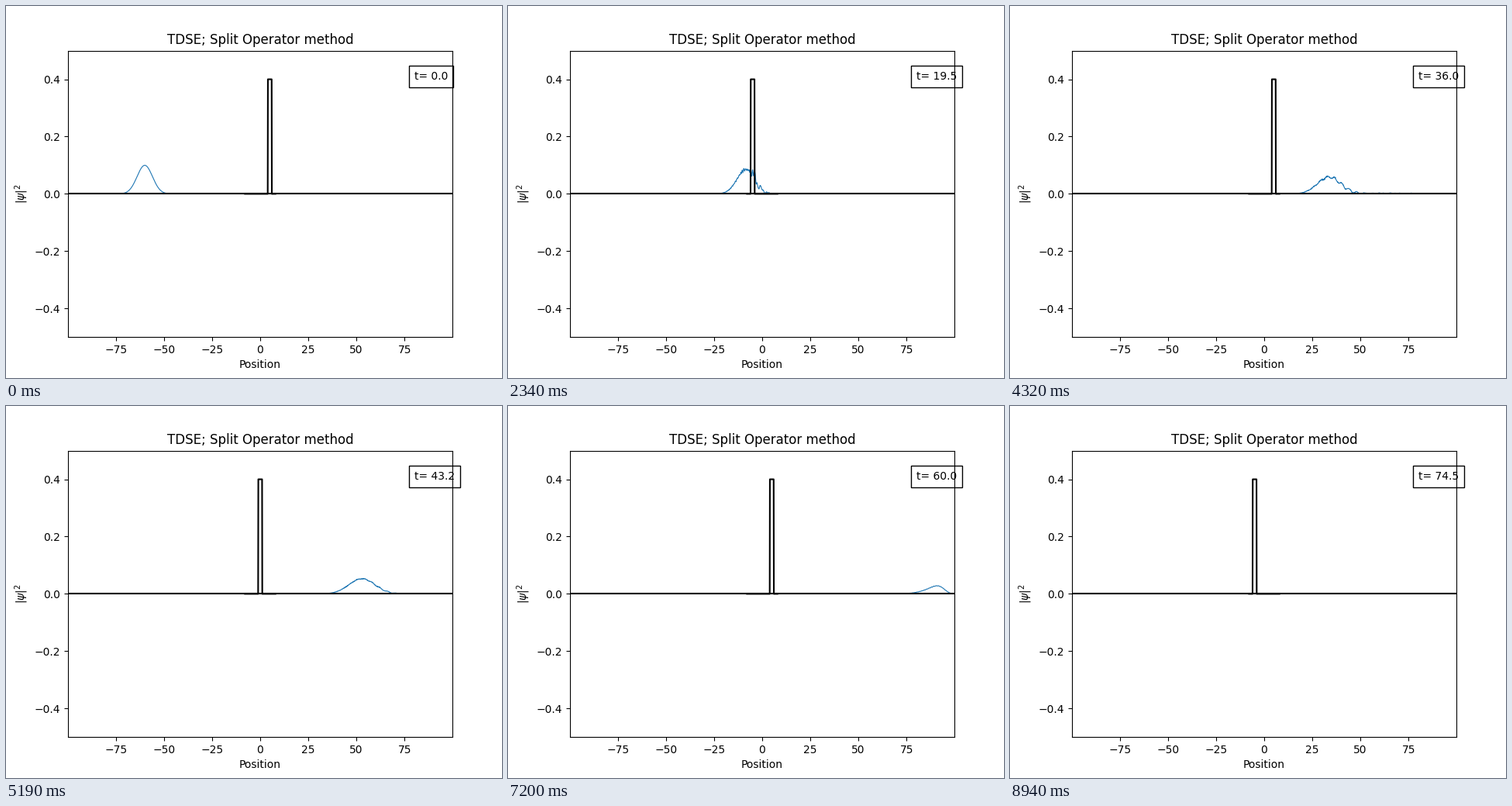
Write a matplotlib script that moves like this. It is 640 px wide and 480 px high and loops after 8.97 s.

```python
import numpy as np
import matplotlib.pyplot as plt
from matplotlib.animation import FuncAnimation

FRAMES = 299
STEPS = 5                 # time steps per frame
DT = 0.05
N, L = 2048, 200.0
SIGMA, X0, K0 = 4.0, -60.0, np.sqrt(7.0)
V0, HALF, SWING, OMEGA = 4.0, 1.0, 5.0, 2 * np.pi

x = -L / 2 + L / N * np.arange(N)
k = 2 * np.pi * np.fft.fftfreq(N, L / N)


def barrier(pos, t):
    """Square barrier whose centre swings about the origin."""
    return V0 * (np.abs(pos - SWING * np.cos(OMEGA * t)) < HALF)


def evolve():
    """Split-operator propagation; yields the density for each frame."""
    psi = (2 * np.pi * SIGMA**2) ** -0.25 * np.exp(
        -((x - X0) ** 2) / (4 * SIGMA**2) + 1j * K0 * x)
    kinetic = np.exp(-0.5j * k**2 * DT)
    edge = np.clip((np.abs(x) - 85) / 15, 0, None)
    absorb = np.exp(-1.8 * edge**3 * DT)
    for frame in range(FRAMES):
        yield np.abs(psi) ** 2
        for step in range(STEPS):
            t = (frame * STEPS + step) * DT
            half = np.exp(-0.5j * barrier(x, t) * DT)
            psi = half * np.fft.ifft(kinetic * np.fft.fft(half * psi))
            psi *= absorb


density = list(evolve())
near = x[np.abs(x) <= 8]

fig, ax = plt.subplots(figsize=(6.4, 4.8), dpi=100)
ax.set_xlim(-99.9, 99.9)
ax.set_ylim(-0.5, 0.5)
ax.set_title("TDSE; Split Operator method")
ax.set_xlabel("Position")
ax.set_ylabel(r"$|\psi|^2$")

wave, = ax.plot(x, density[0], color="C0", lw=0.8)
ax.axhline(0, color="k", lw=1.5)
wall, = ax.plot(near, barrier(near, 0) / 10, color="k", lw=1.5)
clock = ax.text(80, 0.4, "", bbox=dict(facecolor="none", edgecolor="k", pad=5))


def update(frame):
    t = frame * STEPS * DT
    wave.set_ydata(density[frame])
    wall.set_ydata(barrier(near, t) / 10)
    clock.set_text(f"t= {t:.1f}")
    return wave, wall, clock


anim = FuncAnimation(fig, update, frames=FRAMES, interval=30, repeat=True)
plt.show()
```
